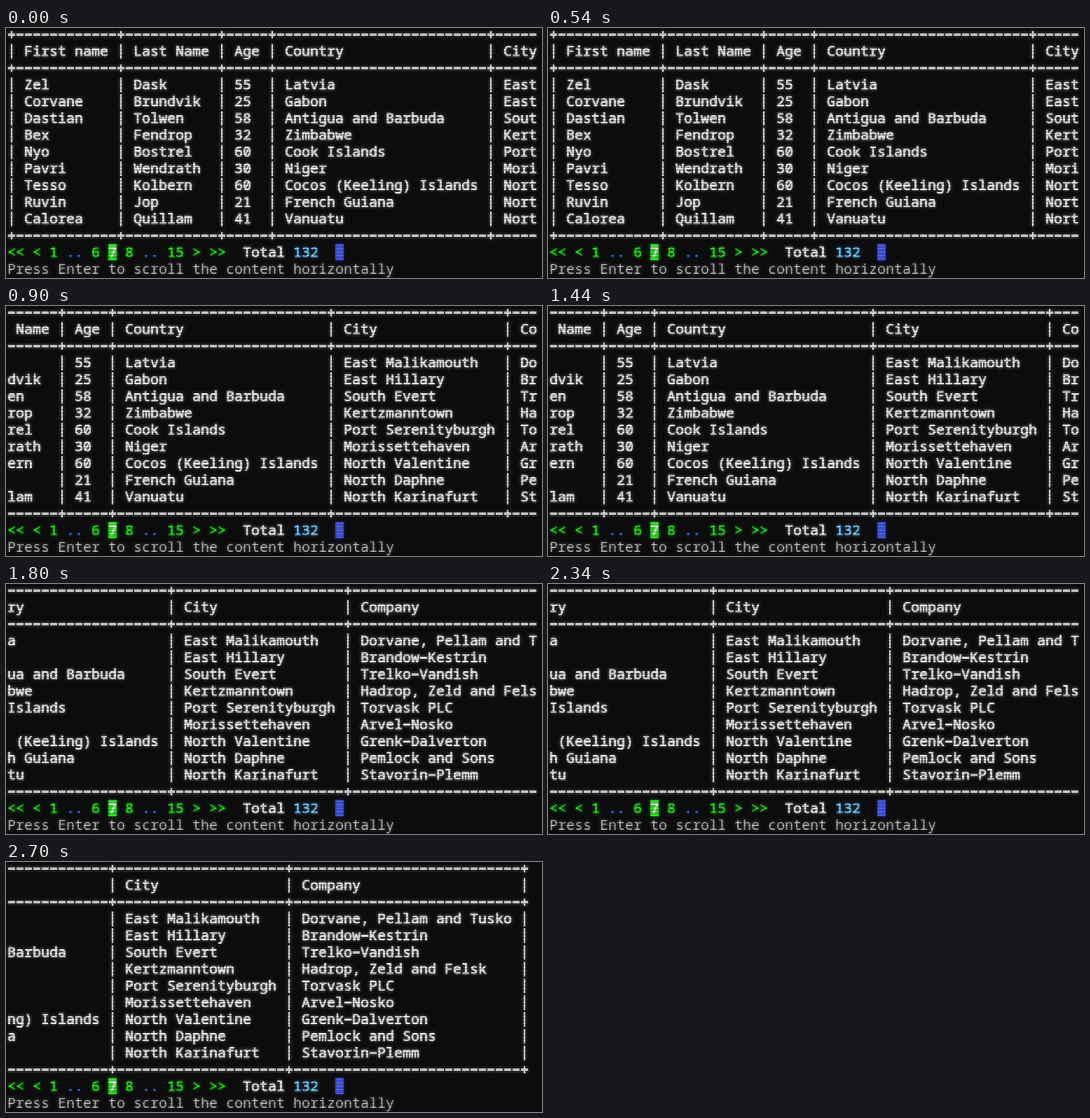
Recreate the animation shown at these times as an HTML page. Size 765 by 358 pixels, loop 3600 ms.

```html
<!DOCTYPE html>
<html lang="en">
<head>
<meta charset="utf-8">
<title>Paged table</title>
<style>
html, body { margin: 0; width: 100%; height: 100%; overflow: hidden; background: #0c0c0c; }
#screen {
  --scan: repeating-linear-gradient(
    #000 0 2px, rgba(0,0,0,.5) 2px 3px, #000 3px 4px, rgba(0,0,0,.5) 4px 5px);
  position: absolute; inset: 0; overflow: hidden; color: #f2f2f2;
  filter: url(#glow); -webkit-mask-image: var(--scan); mask-image: var(--scan);
}
#view { position: absolute; left: 2px; top: -3px; width: 756px; height: 312px; overflow: hidden; }
pre {
  margin: 0; font: 500 20px/24px "Noto Sans Mono", "DejaVu Sans Mono", monospace;
  font-variant-ligatures: none; white-space: pre; -webkit-text-stroke: .6px;
}
#table { width: 1284px; }
#table div { height: 24px; overflow: hidden; }
#foot { position: absolute; left: 2px; top: 309px; }
i {
  --ink: linear-gradient(#f2f2f2, #f2f2f2);
  display: inline-block; width: 12px; height: 24px; vertical-align: top;
  color: transparent; background: no-repeat;
}
.dash { background-image: var(--ink); background-size: 10px 3px; background-position: 1px 11px; }
.bar { background-image: var(--ink); background-size: 2px 21px; background-position: 5px 2px; }
.plus {
  background-image: var(--ink), var(--ink);
  background-size: 10px 3px, 2px 11px; background-position: 1px 11px, 5px 7px;
}
.green { color: #16d60c; }
.blue { color: #3468e0; }
.sky { color: #5cb4ff; }
.dim { color: #a4a4a4; -webkit-text-stroke: 0; }
.on, .cursor { display: inline-block; height: 24px; vertical-align: top; }
.on { background: #14b80c; }
.cursor { width: 12px; background: #303cb8; }
</style>
</head>
<body>
<svg width="0" height="0" style="position:absolute">
  <filter id="glow" x="0" y="0" width="100%" height="100%" color-interpolation-filters="sRGB">
    <feGaussianBlur in="SourceGraphic" stdDeviation="2" result="soft"/>
    <feComposite in="SourceGraphic" in2="soft" operator="arithmetic" k1="0" k2="1" k3=".7" k4="0"/>
  </filter>
</svg>
<div id="screen">
  <div id="view"><pre id="table"></pre></div>
  <pre id="foot"><span class="green">&lt;&lt; &lt; 1 <span class="blue">..</span> 6 </span><span class="on">7</span><span class="green"> 8 <span class="blue">..</span> 15 &gt; &gt;&gt;</span>  Total <span class="sky">132</span>  <span class="cursor"></span>
<span class="dim">Press Enter to scroll the content horizontally</span></pre>
</div>
<script>
const head = ['First name', 'Last Name', 'Age', 'Country', 'City', 'Company'];
const people = [
  ['Zel', 'Dask', '55', 'Latvia', 'East Malikamouth', 'Dorvane, Pellam and Tusko'],
  ['Corvane', 'Brundvik', '25', 'Gabon', 'East Hillary', 'Brandow-Kestrin'],
  ['Dastian', 'Tolwen', '58', 'Antigua and Barbuda', 'South Evert', 'Trelko-Vandish'],
  ['Bex', 'Fendrop', '32', 'Zimbabwe', 'Kertzmanntown', 'Hadrop, Zeld and Felsk'],
  ['Nyo', 'Bostrel', '60', 'Cook Islands', 'Port Serenityburgh', 'Torvask PLC'],
  ['Pavri', 'Wendrath', '30', 'Niger', 'Morissettehaven', 'Arvel-Nosko'],
  ['Tesso', 'Kolbern', '60', 'Cocos (Keeling) Islands', 'North Valentine', 'Grenk-Dalverton'],
  ['Ruvin', 'Jop', '21', 'French Guiana', 'North Daphne', 'Pemlock and Sons'],
  ['Calorea', 'Quillam', '41', 'Vanuatu', 'North Karinafurt', 'Stavorin-Plemm']
];
const widths = head.map((h, c) => Math.max(h.length, ...people.map(p => p[c].length)));
const rule = '+' + widths.map(w => '-'.repeat(w + 2) + '+').join('');
const line = cells => '|' + cells.map((t, c) => ` ${t.padEnd(widths[c])} |`).join('');

const kinds = { '-': 'dash', '|': 'bar', '+': 'plus' };
const markup = row => `<div>${row.replace(/[-|+]/g, ch => `<i class="${kinds[ch]}">${ch}</i>`)}</div>`;
const table = document.getElementById('table');
table.innerHTML = [rule, line(head), rule, ...people.map(line), rule].map(markup).join('');

// Columns scrolled off the left edge at each step.
const CELL = 12, STEP = 900, scrolls = [0, 19, 38, 45];
const stops = [...scrolls, scrolls[0]].map((n, k) => ({
  offset: k / scrolls.length,
  transform: `translateX(${-n * CELL}px)`,
  easing: 'steps(1, end)'
}));
table.animate(stops, { duration: STEP * scrolls.length, iterations: Infinity });
</script>
</body>
</html>
```
